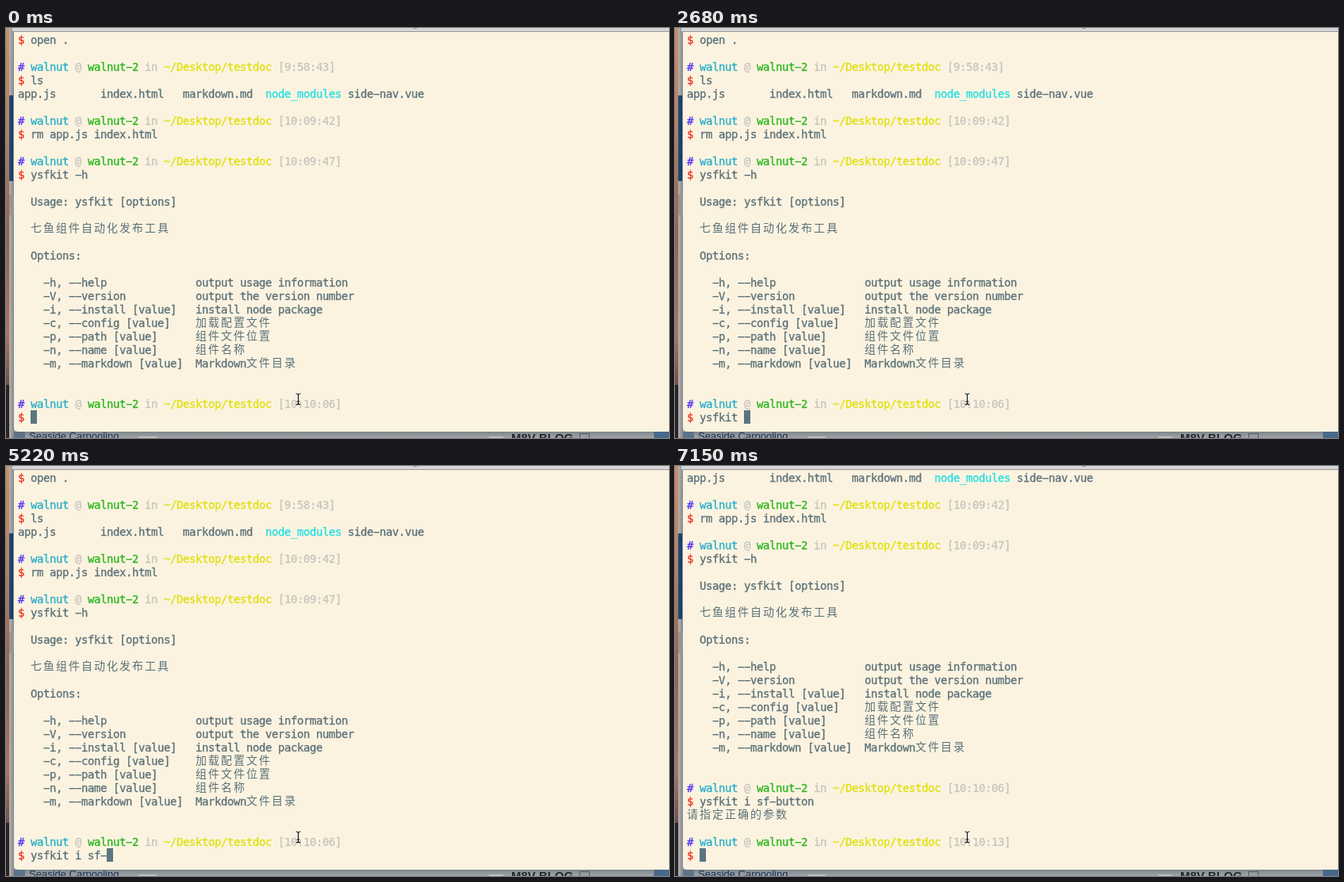
These frames come from a looping animation (836 px wide and 517 px high, 8000 ms). An HTML page with a canvas:

```html
<!DOCTYPE html>
<html lang="zh">
<head>
<meta charset="utf-8">
<title>Terminal</title>
<style>
html, body { margin: 0; width: 836px; height: 517px; overflow: hidden; }
canvas { display: block; }
</style>
</head>
<body>
<canvas id="stage" width="836" height="517"></canvas>
<script>
const ctx = document.getElementById("stage").getContext("2d");
const LOOP = 8000, CELL = 8, ROW = 17, LEFT = 15, TOP = 6;
const LATIN = '14px "DejaVu Sans Mono", monospace';
const CJK = '14px "Noto Sans CJK SC", "Noto Sans CJK", sans-serif';
const C = {
  paper: "#fbf3e0", text: "#5b7078", red: "#f0301c", blue: "#5030f5", cyan: "#28aec8",
  grey: "#c6c4bd", green: "#2ab51c", yellow: "#dfe00c", aqua: "#22dfe4", cursor: "#5b7580"
};

// A line is a list of [text, colour] runs.
const plain = text => [[text, C.text]];
const blank = [];
const command = text => [["$ ", C.red], [text, C.text]];
const prompt = time => [
  ["# ", C.blue], ["walnut", C.cyan], [" @ ", C.grey], ["walnut-2", C.green],
  [" in ", C.grey], ["~/Desktop/testdoc", C.yellow], [` [${time}]`, C.grey]
];
const option = (flags, info) => plain("    " + flags.padEnd(24) + info);

const history = [
  command("open ."), blank,
  prompt("9:58:43"), command("ls"),
  [["app.js".padEnd(13) + "index.html".padEnd(13) + "markdown.md".padEnd(13), C.text],
   ["node_modules ", C.aqua], ["side-nav.vue", C.text]], blank,
  prompt("10:09:42"), command("rm app.js index.html"), blank,
  prompt("10:09:47"), command("ysfkit -h"), blank,
  plain("  Usage: ysfkit [options]"), blank,
  plain("  七鱼组件自动化发布工具"), blank,
  plain("  Options:"), blank,
  option("-h, --help", "output usage information"),
  option("-V, --version", "output the version number"),
  option("-i, --install [value]", "install node package"),
  option("-c, --config [value]", "加载配置文件"),
  option("-p, --path [value]", "组件文件位置"),
  option("-n, --name [value]", "组件名称"),
  option("-m, --markdown [value]", "Markdown文件目录"), blank, blank,
  prompt("10:10:06")
];
const error = plain("请指定正确的参数");

// [time, characters typed]; one wrong key is typed and deleted again.
const typed = "ysfkit i sf-button", slip = "ysfkit i sf=";
const keys = [
  [0, 0], [1040, 2], [1190, 3], [1640, 4], [1780, 6], [2680, 7], [3130, 8], [3280, 9],
  [4180, 10], [4320, 11], [4470, 12], [4920, 11], [5220, 12], [5360, 13], [5510, 14],
  [5660, 15], [5810, 16], [5960, 17], [6110, 18]
];

function screenAt(t) {
  if (t >= 7000) {
    const lines = [...history, command(typed), error];
    return t < 7150 ? { lines, cursor: -1 }
      : { lines: [...lines, blank, prompt("10:10:13"), command("")], cursor: 0 };
  }
  const count = keys.filter(k => k[0] <= t).pop()[1];
  const source = t >= 4470 && t < 4920 ? slip : typed;
  return { lines: [...history, command(source.slice(0, count))], cursor: count };
}

function box(x, y, w, h, colour) {
  ctx.fillStyle = colour;
  ctx.fillRect(x, y, w, h);
}

function label(text, x, y, font, colour) {
  ctx.font = font;
  ctx.fillStyle = colour;
  ctx.fillText(text, x, y);
}

function gradient(x0, y0, x1, y1, ...colours) {
  const g = ctx.createLinearGradient(x0, y0, x1, y1);
  colours.forEach((c, i) => g.addColorStop(i / (colours.length - 1), c));
  return g;
}

function drawDesktop() {
  box(0, 0, 836, 517, "#a0a3a6");
  box(0, 0, 4, 517, gradient(0, 0, 0, 517, "#c98f6c", "#b57f62", "#8f6654", "#a87562", "#3a2a28"));
  box(4, 0, 6, 517, gradient(4, 0, 10, 0, "#b4b4b4", "#85888b"));
  box(4, 85, 5, 108, gradient(4, 0, 9, 0, "#1f5080", "#163a60"));
  box(4, 210, 6, 26, "#969696");
  box(0, 450, 4, 67, "#2b2422");
  box(10, 509, 826, 8, gradient(0, 509, 0, 517, "#7f858b", "#a0a5aa"));
  box(10, 509, 14, 8, "#5d7388");
  box(817, 509, 19, 8, "#48698a");
  box(167, 515, 23, 2, "#bcbec0");
  box(609, 515, 18, 2, "#bcbec0");
  label("Seaside Carpooling", 29, 519, '13px "Liberation Sans", sans-serif', "#17324f");
  label("M8V BLOG", 637, 522, 'bold 15px "Liberation Sans", sans-serif', "#23282d");
  ctx.strokeStyle = "#555b60";
  ctx.lineWidth = 1;
  ctx.strokeRect(723.5, 511.5, 12, 10);

  ctx.fillStyle = C.paper;
  ctx.beginPath();
  ctx.roundRect(10, 0, 832, 509, [0, 0, 0, 5]);
  ctx.fill();
  box(8, 0, 828, 4, "#d6d6d6");
  box(8, 4, 828, 1, "#979797");
  box(514, 0, 4, 1, "#8a8a8a");
}

// Dashes are drawn nearly as wide as the cell; a hairline stroke thickens the strokes.
function drawLine(line, y) {
  let x = LEFT;
  ctx.lineWidth = 0.3;
  for (const [text, colour] of line) {
    ctx.strokeStyle = colour;
    for (const ch of text) {
      const wide = ch > "\u2e80";
      const glyph = ch === "-" ? "\u2212" : ch;
      const base = y + (wide ? 13 : 14);
      label(glyph, x, base, wide ? CJK : LATIN, colour);
      if (!wide) ctx.strokeText(glyph, x, base);
      x += wide ? 2 * CELL : CELL;
    }
  }
}

function drawPointer(x, y) {
  const stem = new Path2D(`M${x - 3} ${y - 7}q3 0 3 2v10q0 2 -3 2M${x + 3} ${y - 7}q-3 0 -3 2M${x} ${y + 5}q0 2 3 2M${x - 2} ${y + 3}h4`);
  for (const [width, colour] of [[3, "#fffdf5"], [1.2, "#111"]]) {
    ctx.lineWidth = width;
    ctx.strokeStyle = colour;
    ctx.stroke(stem);
  }
}

function frame() {
  const { lines, cursor } = screenAt(performance.now() % LOOP);
  drawDesktop();
  lines.slice(-29).forEach((line, i) => drawLine(line, TOP + i * ROW));
  if (cursor >= 0) box(LEFT + (cursor + 2) * CELL, TOP + 28 * ROW, CELL, ROW, C.cursor);
  drawPointer(368.5, 468);
  requestAnimationFrame(frame);
}
frame();
</script>
</body>
</html>
```
